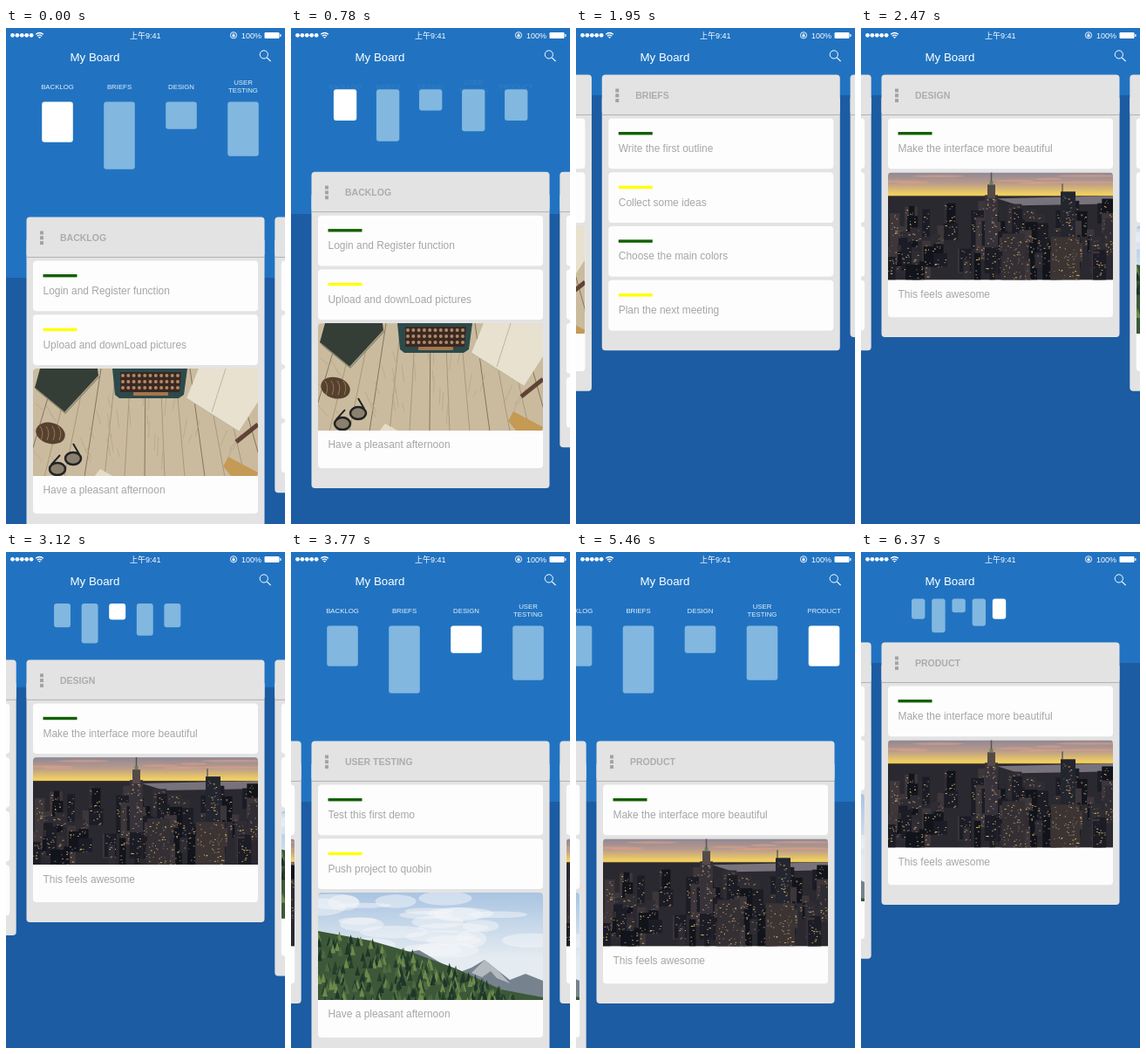
These frames come from a looping animation (320x568 px, 6500 ms). An HTML page:

```html
<!DOCTYPE html>
<html lang="en">
<head>
<meta charset="utf-8">
<title>Board</title>
<style>
html, body { margin: 0; width: 100%; height: 100%; overflow: hidden; background: #1c5ca3; }
svg { display: block; }
#stage { width: 320px; height: 568px; }
text { font: 11.95px "Liberation Sans", Arial, sans-serif; fill: #a6a6a6; }
.heading { font-size: 10.5px; font-weight: bold; fill: #acacac; }
.title { font-size: 13.3px; fill: #fff; }
.status { font: 9px "Liberation Sans", "Noto Sans CJK SC", "Noto Sans CJK", sans-serif; fill: #fff; }
.label { font-size: 7.8px; fill: #e4f0fa; text-anchor: middle; }
</style>
</head>
<body>
<svg id="stage" viewBox="0 0 320 568"></svg>
<script>
const LOOP = 6500, STEP = 130;
const FOLDED = 53.6, MINI = 103.6, OPEN = 216.6, PITCH = 284.8;
const GREEN = '#126000', YELLOW = '#ffff00';

const rect = (x, y, w, h, fill, r = 0, more = '') =>
  `<rect x="${x}" y="${y}" width="${w}" height="${h}" rx="${r}" fill="${fill}" ${more}/>`;
const poly = (points, fill) => `<polygon points="${points}" fill="${fill}"/>`;
const oval = (x, y, rx, ry, fill, more = '') =>
  `<ellipse cx="${x}" cy="${y}" rx="${rx}" ry="${ry}" fill="${fill}" ${more}/>`;
const line = (d, stroke, width = 1) =>
  `<path d="${d}" fill="none" stroke="${stroke}" stroke-width="${width}"/>`;
const text = (x, y, str, cls = '') => `<text x="${x}" y="${y}" class="${cls}">${str}</text>`;
const repeat = (n, fn) => Array.from({ length: n }, (_, i) => fn(i)).join('');
const gradient = (id, ...colors) =>
  `<linearGradient id="${id}" x2="0" y2="1">${colors.map(([at, c]) =>
    `<stop offset="${at}" stop-color="${c}"/>`).join('')}</linearGradient>`;

let seed = 7;
const random = (lo, hi) => {
  seed = seed * 16807 % 2147483647;
  return +(lo + (hi - lo) * seed / 2147483647).toFixed(1);
};

function desk() {
  return rect(0, 0, 258, 124, '#cabb9f') +
    repeat(13, i => line(`M${i * 17 + 27} 0L${i * 23 - 10} 124`, i % 3 ? '#a8977c' : '#85745c')) +
    repeat(40, () => {
      const x = random(0, 258), y = random(20, 100);
      return line(`M${x} ${y}l${(x - 129) / -12} ${random(8, 24)}`, '#b7a68a', .8);
    }) +
    poly('8,0 74,0 75,8 36,50 2,22', '#343e37') +
    line('M4 24L37 51L76 9', '#8c8a72', 1.5) +
    poly('91,0 177,0 173,30 167,34 99,34 94,30', '#2d4a4b') +
    poly('100,4 170,4 168,27 100,27', '#3a2822') +
    repeat(33, i => oval(103 + i % 11 * 6.3, 8 + Math.floor(i / 11) * 7, 2, 2, '#b18a66')) +
    rect(115, 27, 40, 4, '#a5764e', 1) +
    poly('190,0 258,0 258,38 236,72 176,34', '#e8e1d0') +
    line('M221 0L205 50M236 72L176 34', '#bfb49d') +
    line('M233 84L258 64', '#5f4336', 5) +
    oval(20, 74, 17, 12, '#56412f', 'transform="rotate(15 20 74)"') +
    repeat(4, i => line(`M${8 + i * 7} 66q5 7 1 16`, '#94785c')) +
    oval(46, 103, 9, 7, '#8b806e', 'stroke="#222" stroke-width="2.5"') +
    oval(28, 115, 9, 7, '#8b806e', 'stroke="#222" stroke-width="2.5"') +
    line('M53 98L46 86M21 110L31 99', '#222', 2) +
    poly('70,124 77,115 93,124', '#e5dcc8') +
    poly('224,101 258,119 256,124 228,124 218,112', '#c59a55');
}

function city() {
  const lights = ['#e0b860', '#8c7a68', '#b58b58', '#6f7078'];
  const tower = (x, y, w, h, fill) => rect(x, y, w, h, fill) +
    repeat(Math.floor(w * h / 28), i =>
      rect(random(x + 1, x + w - 2), random(y + 2, y + h), random(.8, 2.2), 1, lights[i % 4]));
  const shades = ['#1b1c25', '#2f2c33', '#12141c', '#3d363a'];
  return rect(0, 0, 258, 124, 'url(#dusk)') +
    repeat(9, () => oval(random(0, 258), random(2, 13), random(15, 40), 1.3, '#d9a08a', 'opacity=".6"')) +
    rect(0, 27, 258, 97, '#2a2930') + poly('125,30 258,27 258,36 150,38', '#77727c') +
    repeat(95, i => {
      const y = 29 + i * .75;
      return tower(random(-8, 252), y + random(-2, 9), random(6, 17), random(15, 50), shades[i % 4]);
    }) +
    tower(111, 26, 15, 60, '#37323a') + rect(114, 14, 9, 16, '#554a48') +
    line('M118.500 0V14', '#59515c', 1.5) + rect(116.5, 10, 4, 4, '#63805a') +
    tower(198, 22, 17, 62, '#23252f') + line('M200 13V23', '#35343f') +
    tower(131, 70, 26, 54, '#332f33') + tower(187, 74, 33, 50, '#3b3433');
}

function mountain() {
  const ridge = x => 44 + x * .13 + x * x * .0009;
  return rect(0, 0, 258, 124, 'url(#day)') +
    repeat(24, () => oval(random(0, 258), random(4, 68), random(16, 42), random(3, 10), '#f6f8fa', 'opacity=".5"')) +
    poly('60,75 84,63 102,68 116,66 140,80 160,92 176,86 191,77 206,89 220,100 238,93 258,101 258,124 60,124', '#76838e') +
    poly('191,77 206,89 220,104 205,98 198,90 188,97 176,92', '#b3bac0') +
    poly(`0,124 0,44 60,${ridge(60)} 110,${ridge(110)} 160,${ridge(160)} 210,${ridge(210)} 258,120 258,124`, '#3c5838') +
    repeat(300, i => {
      const x = random(0, 225), top = ridge(x), y = top - 4 + (124 - top) * i / 300;
      return poly(`${x},${y} ${x + 3},${y + 11} ${x - 3},${y + 11}`, ['#263f2c', '#4a6b40', '#6d8a4c', '#1e3528'][i % 4]);
    });
}

const card = (str, color) => ({ str, color });
const photo = (str, image) => ({ str, image });
const skyline = [card('Make the interface more beautiful', GREEN), photo('This feels awesome', 'city')];
const lists = [
  { name: 'BACKLOG', bar: 46, cards: [card('Login and Register function', GREEN),
    card('Upload and downLoad pictures', YELLOW), photo('Have a pleasant afternoon', 'desk')] },
  { name: 'BRIEFS', bar: 77, cards: [card('Write the first outline', GREEN), card('Collect some ideas', YELLOW),
    card('Choose the main colors', GREEN), card('Plan the next meeting', YELLOW)] },
  { name: 'DESIGN', bar: 31, cards: skyline },
  { name: 'USER TESTING', bar: 62, cards: [card('Test this first demo', GREEN),
    card('Push project to quobin', YELLOW), photo('Have a pleasant afternoon', 'mountain')] },
  { name: 'PRODUCT', bar: 46, cards: skyline }
];

function column({ name, cards }, index) {
  let y = 50;
  const items = cards.map(({ str, color, image }) => {
    const height = image ? 166 : 57.7;
    const item = `<g transform="translate(7.500 ${y})">` + rect(0, 0, 258, height, '#fdfdfd', 4) +
      (image ? `<use href="#${image}"/>` + text(11.5, 143.4, str)
             : rect(11.5, 15.4, 39, 3.4, color) + text(11.5, 38.4, str)) + '</g>';
    y += height + 4;
    return item;
  }).join('');
  return `<g transform="translate(${23.5 + index * PITCH} 0)"><g class="body">` +
    rect(0, 24, 273, y - 5.2, '#e3e3e3', 4) + items + '</g>' +
    rect(0, 0, 273, 46, '#e3e3e3', 4) + rect(0, 45.4, 273, 1, '#b2b2b2') +
    repeat(3, i => rect(15.5, 15.9 + i * 5.8, 4, 4, '#a3a3a3')) +
    text(38.5, 27.4, name, 'heading') + '</g>';
}

function thumb({ name }) {
  const words = name.split(' '), first = words.length > 1 ? 64.6 : 70;
  return '<g class="thumb"><rect rx="3"/><g>' +
    words.map((w, i) => text(0, first + i * 9, w, 'label')).join('') + '</g></g>';
}

const statusBar = repeat(5, i => oval(7.5 + i * 5.4, 8.3, 2.4, 2.4, '#fff')) +
  line('M34.200 7.300q4.300-3.600 8.600 0M35.800 9.200q2.700-2.200 5.400 0', '#fff', 1.3) +
  poly('36.900,10 40.100,10 38.500,12', '#fff') +
  text(142, 12, '上午9:41', 'status') + text(270, 12, '100%', 'status') +
  oval(261, 8.3, 3.6, 3.6, 'none', 'stroke="#fff" stroke-width=".9"') +
  rect(259.5, 7.8, 3, 2.4, '#fff') + line('M260.200 8V6.800h1.600V8', '#fff', .7) +
  rect(296.5, 5, 17, 7, '#fff', 1.3) + rect(314.2, 7, 1.3, 3, '#fff', .6);

const stage = document.getElementById('stage');
const symbol = (id, art) => `<symbol id="${id}" width="258" height="123" viewBox="0 0 258 123">${art}</symbol>`;
stage.innerHTML = '<defs>' +
  gradient('dusk', [0, '#8f8794'], [.1, '#b99a8c'], [.2, '#f0d060'], [.25, '#e8a850'], [.3, '#80695f']) +
  gradient('day', [0, '#a9c4e2'], [.6, '#e4ebf1']) +
  `<clipPath id="round">${rect(0, 0, 258, 140, '#000', 4)}</clipPath>` +
  Object.entries({ desk, city, mountain }).map(([id, draw]) =>
    symbol(id, `<g clip-path="url(#round)">${draw()}</g>`)).join('') + '</defs>' +
  rect(0, 0, 320, 568, '#1c5ca3') + rect(0, 0, 320, 286, '#2173c1', 0, 'id="header"') +
  `<g id="thumbs">${lists.map(thumb).join('')}</g>` +
  `<g id="columns">${lists.map(column).join('')}</g>` + statusBar +
  text(73.5, 38, 'My Board', 'title') +
  oval(295.8, 30.4, 4.6, 4.6, 'none', 'stroke="#fff"') +
  line('M299.200 33.800L303.600 38.200', '#fff', 1.2);

const header = document.getElementById('header');
const thumbs = document.getElementById('thumbs');
const columns = document.getElementById('columns');
const firstBody = document.querySelector('.body');

const mix = (a, b, k) => a + (b - a) * k;
const clamp = v => Math.min(1, Math.max(0, v));

// Eased value through [time, value] keys
function track(t, keys) {
  const next = keys.findIndex(key => key[0] > t);
  if (next < 0) return keys[keys.length - 1][1];
  if (next === 0) return keys[0][1];
  const [t0, a] = keys[next - 1], [t1, b] = keys[next], k = (t - t0) / (t1 - t0);
  return mix(a, b, k * k * (3 - 2 * k));
}

const topKeys = [[460, OPEN], [1310, FOLDED], [2600, FOLDED], [2900, MINI], [3040, MINI], [3340, OPEN],
  [5480, OPEN], [5850, FOLDED], [6000, FOLDED], [6370, MINI]];
const pageKeys = [[1640, 0], [1980, 1], [2080, 1], [2420, 2], [3370, 2], [3700, 3], [3860, 3], [4250, 2],
  [4500, 2], [4946, 3], [5040, 3], [5380, 4]];
const scrollKeys = [[1240, 0], [1430, 21.3], [1680, 0]];
const shiftKeys = [[5040, 0], [5380, 58.5]];
const selectedAt = t => t < 2000 ? 0 : t < 2430 ? 1 : t < 4950 ? 2 : t < 5390 ? 3 : 4;

function render(t) {
  const top = track(t, topKeys), grow = clamp((top - MINI) / (OPEN - MINI));
  const shift = track(t, shiftKeys), selected = selectedAt(t);
  header.setAttribute('height', top + mix(23.4, 69.4, grow));
  columns.setAttribute('transform', `translate(${-PITCH * track(t, pageKeys)} ${top})`);
  firstBody.setAttribute('transform', `translate(0 ${-track(t, scrollKeys)})`);
  thumbs.setAttribute('opacity', clamp((top - FOLDED) / (MINI - FOLDED)));
  [...thumbs.children].forEach((node, i) => {
    const [bar, label] = node.children;
    const x = mix(58 + 23.2 * i, 41.2 + 71 * i - shift, grow), width = mix(15.4, 35.6, grow);
    const fill = i === selected ? '#fff' : '#82b7df';
    const box = { x, y: mix(53.5, 84.4, grow), width, height: lists[i].bar * mix(.5, 1, grow) + .3, fill };
    for (const key in box) bar.setAttribute(key, box[key]);
    label.setAttribute('transform', `translate(${x + width / 2} 0)`);
    label.setAttribute('opacity', clamp(grow * 2 - 1));
  });
}

const start = performance.now();
function frame() {
  const t = (performance.now() - start) % LOOP;
  render(Math.floor(t / STEP) * STEP);
  requestAnimationFrame(frame);
}
frame();
</script>
</body>
</html>
```
